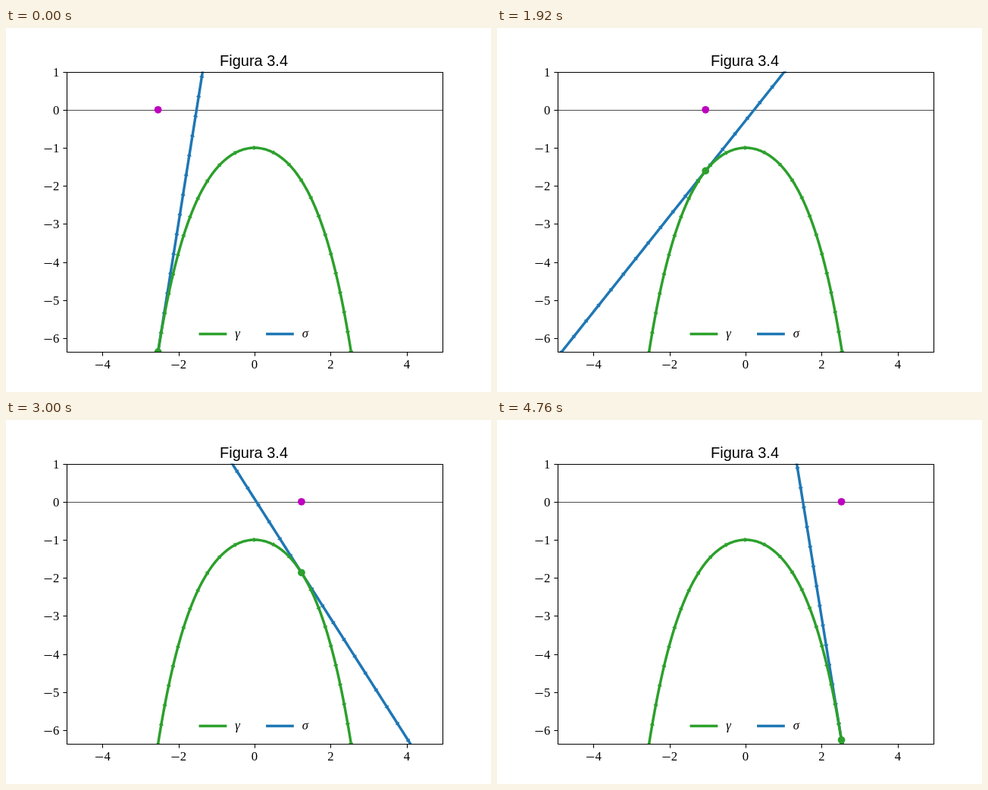
These frames come from a looping animation (640 by 480 pixels, 4.8 s). An HTML page with a canvas:

```html
<!DOCTYPE html>
<html lang="es">
<head>
<meta charset="utf-8">
<title>Figura 3.4</title>
<style>
  html, body { margin: 0; width: 100%; height: 100%; overflow: hidden; background: #fff; }
  canvas { display: block; }
</style>
</head>
<body>
<canvas id="stage" width="640" height="480"></canvas>
<script>
const ctx = document.getElementById('stage').getContext('2d');
const GREEN = '#2ca02c', BLUE = '#1f77b4', MAGENTA = '#bf00bf';
const LEFT = 80, RIGHT = 576, TOP = 57.6, BOTTOM = 427.2;
const STEP_MS = 40, STEPS = 120, S_MAX = 2 * Math.PI, LINE = 3.47;
const SCALE = (BOTTOM - TOP) / (1 + Math.hypot(1, S_MAX));
const SERIF = '"Liberation Serif", serif', SANS = '"Liberation Sans", sans-serif';

const px = x => (LEFT + RIGHT) / 2 + x * SCALE;
const py = y => TOP + (1 - y) * SCALE;
const snap = v => Math.floor(v + 0.5) + 0.5;

// Inverted catenary y = -cosh x, parametrised by arc length s
const catenary = s => {
  const h = Math.hypot(1, s);
  return { x: Math.asinh(s), y: -h, dx: 1 / h, dy: -s / h };
};

// Tangent at t, with the contact point at s = t
const tangent = t => {
  const c = catenary(t);
  return s => ({ ...c, x: c.x + (s - t) * c.dx, y: c.y + (s - t) * c.dy });
};

function stroke(points, color, width, cap = 'butt') {
  ctx.beginPath();
  for (const [x, y] of points) ctx.lineTo(x, y);
  ctx.strokeStyle = color;
  ctx.lineWidth = width;
  ctx.lineCap = cap;
  ctx.lineJoin = 'round';
  ctx.stroke();
}

function arrowHead(p, color) {
  ctx.save();
  ctx.translate(px(p.x), py(p.y));
  ctx.rotate(Math.atan2(-p.dy, p.dx));
  ctx.beginPath();
  ctx.moveTo(-1.5, -3.2);
  ctx.lineTo(3.5, 0);
  ctx.lineTo(-1.5, 3.2);
  ctx.fillStyle = color;
  ctx.fill();
  ctx.restore();
}

function drawCurve(curve, limit, color) {
  const points = [];
  for (let i = -120; i <= 120; i++) {
    const p = curve(limit * i / 120);
    points.push([px(p.x), py(p.y)]);
  }
  stroke(points, color, LINE, 'square');
  const count = Math.round(limit / (Math.PI / 6));
  for (let j = -count; j <= count; j++) arrowHead(curve(j * Math.PI / 6), color);
}

function dot(x, y, color) {
  ctx.beginPath();
  ctx.arc(px(x), py(y), 4.86, 0, 2 * Math.PI);
  ctx.fillStyle = color;
  ctx.fill();
}

function text(str, x, y, font, align = 'left') {
  ctx.font = font;
  ctx.textAlign = align;
  ctx.fillStyle = '#000';
  ctx.fillText(str, x, y);
}

function tickLabel(value, right, baseline) {
  text(Math.abs(value), right, baseline, `16.67px ${SERIF}`, 'right');
  if (value < 0) ctx.fillRect(right - 19.8, Math.round(baseline - 4.8), 10.2, 1);
}

function drawAxes() {
  ctx.strokeStyle = '#000';
  ctx.lineWidth = 1.1;
  ctx.strokeRect(snap(LEFT), snap(TOP), RIGHT - LEFT, snap(BOTTOM) - snap(TOP));
  for (let x = -4; x <= 4; x += 2) {
    const u = snap(px(x));
    stroke([[u, 428], [u, 432.6]], '#000', 1.1);
    tickLabel(x, px(x) + (x < 0 ? 10.6 : 4.2), 449);
  }
  for (let y = -6; y <= 1; y++) {
    const v = snap(py(y));
    stroke([[75.4, v], [80, v]], '#000', 1.1);
    tickLabel(y, 70.3, v + 5);
  }
  text('Figura 3.4', 327, 50, `20px ${SANS}`, 'center');
}

function legendItem(x, color, label) {
  stroke([[x, 403.5], [x + 33.3, 403.5]], color, LINE, 'square');
  text(label, x + 46, 408, `italic 16.67px ${SERIF}`);
}

function render(ms) {
  const t = S_MAX * (2 * (Math.floor(ms / STEP_MS) % STEPS) / STEPS - 1);
  const contact = catenary(t);
  ctx.fillStyle = '#fff';
  ctx.fillRect(0, 0, 640, 480);

  ctx.save();
  ctx.beginPath();
  ctx.rect(LEFT, TOP, RIGHT - LEFT, BOTTOM - TOP);
  ctx.clip();
  stroke([[LEFT, snap(py(0))], [RIGHT, snap(py(0))]], 'rgba(0,0,0,0.7)', 1);
  drawCurve(tangent(t), 5 * Math.PI, BLUE);
  drawCurve(catenary, S_MAX, GREEN);
  dot(contact.x, contact.y, GREEN);
  dot(contact.x, 0, MAGENTA);
  ctx.restore();

  drawAxes();
  legendItem(256.3, GREEN, 'γ');
  legendItem(344.8, BLUE, 'σ');
}

const start = performance.now();
function loop() {
  render(performance.now() - start);
  requestAnimationFrame(loop);
}
loop();
</script>
</body>
</html>
```
